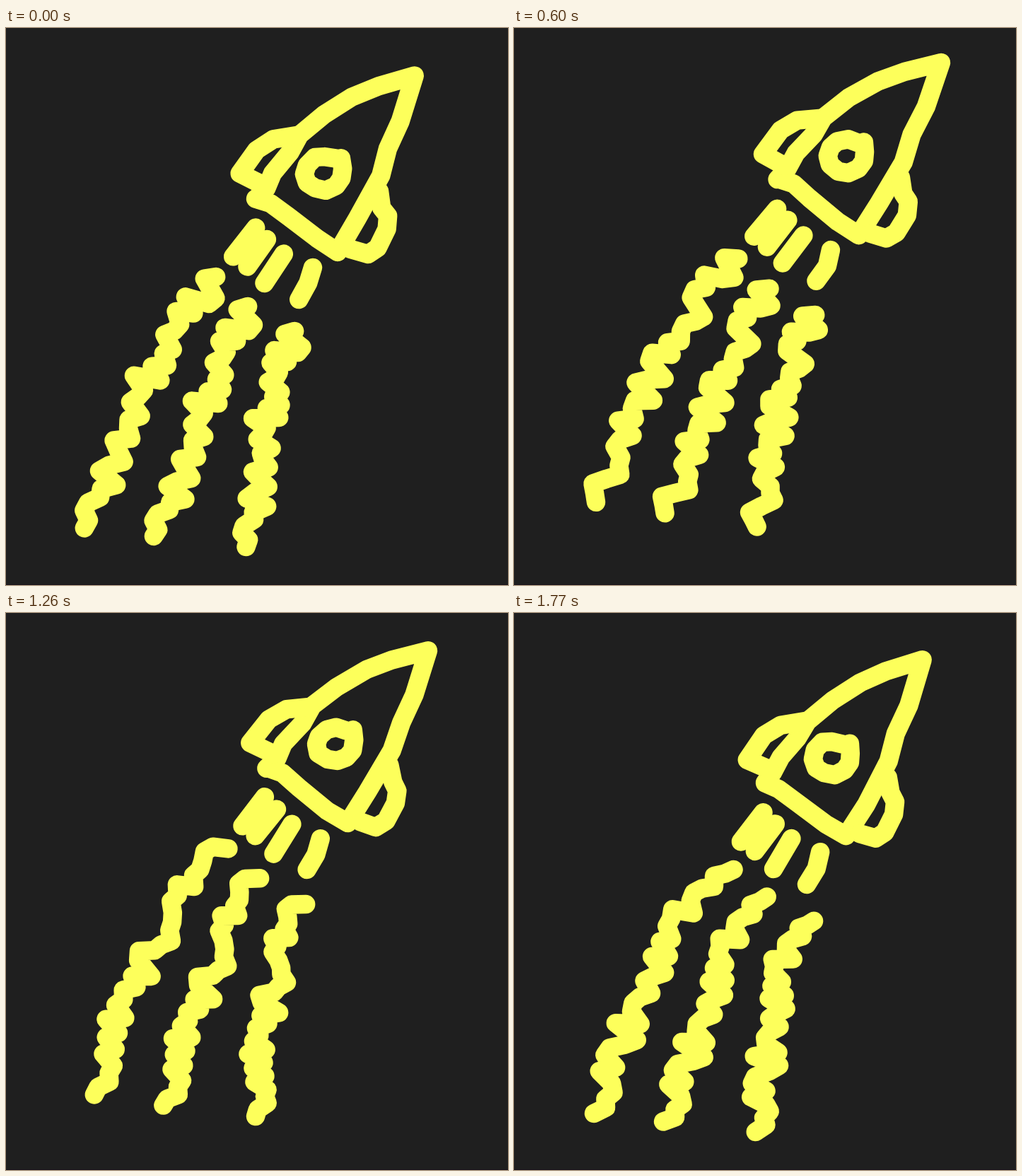
Animation, 710 px wide and 788 px high, one loop 1800 ms. Source, as an HTML page with a canvas:

```html
<!DOCTYPE html>
<html lang="en">
<head>
<meta charset="utf-8">
<title>Rocket doodle</title>
<style>
  html, body { margin: 0; width: 100%; height: 100%; overflow: hidden; background: #1f1f1f; }
  canvas { display: block; width: 710px; height: 788px; }
</style>
</head>
<body>
<canvas id="stage" width="710" height="788"></canvas>
<script>
const LOOP = 1800, TICK = 30;
const PIVOT = [1069, 725], SWING = 0.05;
const KNOTS = 34, WIGGLE = 20, SHAKE = 1.2;
const ctx = document.getElementById('stage').getContext('2d');

const hull = [[354, 241], [367, 226], [377, 205], [401, 177], [415, 152], [450, 123], [490, 98],
  [526, 82], [577, 67], [558, 132], [541, 170], [530, 210], [498, 270], [470, 316], [440, 298],
  [400, 267], [375, 248], [354, 241]];
const leftFin = [[412, 153], [378, 158], [354, 173], [330, 207], [362, 222]];
const rightFin = [[528, 232], [532, 255], [539, 267], [538, 285], [525, 311], [511, 319], [488, 312]];
const bars = [
  [[353, 283], [322, 324]],
  [[370, 298], [341, 338]],
  [[392, 319], [366, 361]],
  [[433, 339], [427, 361], [414, 384]]
];

// Open hand-drawn ring
const eye = Array.from({ length: 11 }, (_, i) => {
  const a = -0.95 - i * 0.56;
  return [449 + 27 * Math.cos(a), 205 + 24 * Math.sin(a)];
}).concat([[474, 184]]);

// Quadratic spines of the smoke trails: start, control, end
const trails = [
  [[297, 352], [166, 513], [122, 710]],
  [[342, 394], [267, 550], [220, 722]],
  [[408, 429], [350, 567], [351, 734]]
];

// Repeatable random numbers from -1 to 1
function seeded(seed) {
  let s = seed * 7919 + 12345;
  return () => {
    s = (s + 0x6D2B79F5) | 0;
    let v = Math.imul(s ^ (s >>> 15), 1 | s);
    v = (v + Math.imul(v ^ (v >>> 7), 61 | v)) ^ v;
    return ((v ^ (v >>> 14)) >>> 0) / 2147483648 - 1;
  };
}

// Point on a spine at u, pushed sideways by d
function trailPoint([a, c, b], u, d) {
  const at = k => (1 - u) ** 2 * a[k] + 2 * u * (1 - u) * c[k] + u * u * b[k];
  const slope = k => (1 - u) * (c[k] - a[k]) + u * (b[k] - c[k]);
  const tx = slope(0), ty = slope(1), len = Math.hypot(tx, ty);
  return [at(0) + d * ty / len, at(1) - d * tx / len];
}

function stroke(points) {
  ctx.beginPath();
  points.forEach(p => ctx.lineTo(...p));
  ctx.stroke();
}

function draw(t) {
  const rand = seeded(t / TICK + 1);
  const lift = (1 - Math.cos(2 * Math.PI * (t + 25) / LOOP)) / 2;

  ctx.setTransform(1, 0, 0, 1, 0, 0);
  ctx.fillStyle = '#1f1f1f';
  ctx.fillRect(0, 0, 710, 788);
  ctx.fillStyle = '#1a121b';
  ctx.fillRect(0, 787, 710, 1);

  ctx.translate(...PIVOT);
  ctx.rotate(SWING * lift);
  ctx.translate(-PIVOT[0], -PIVOT[1]);
  ctx.strokeStyle = '#fdff5b';
  ctx.lineWidth = 26.5;
  ctx.lineCap = ctx.lineJoin = 'round';

  // All trails share one wiggle, redrawn on every tick
  const wiggle = Array.from({ length: KNOTS + 1 }, () => rand() * WIGGLE);
  trails.forEach(trail => stroke(wiggle.map((d, i) => trailPoint(trail, i / KNOTS, d))));

  [hull, leftFin, rightFin, eye, ...bars].forEach(part =>
    stroke(part.map(([x, y]) => [x + rand() * SHAKE, y + rand() * SHAKE])));
}

const start = performance.now();
let shown = -1;
function loop() {
  const t = Math.floor((performance.now() - start) % LOOP / TICK) * TICK;
  if (t !== shown) draw(shown = t);
  requestAnimationFrame(loop);
}
loop();
</script>
</body>
</html>
```
